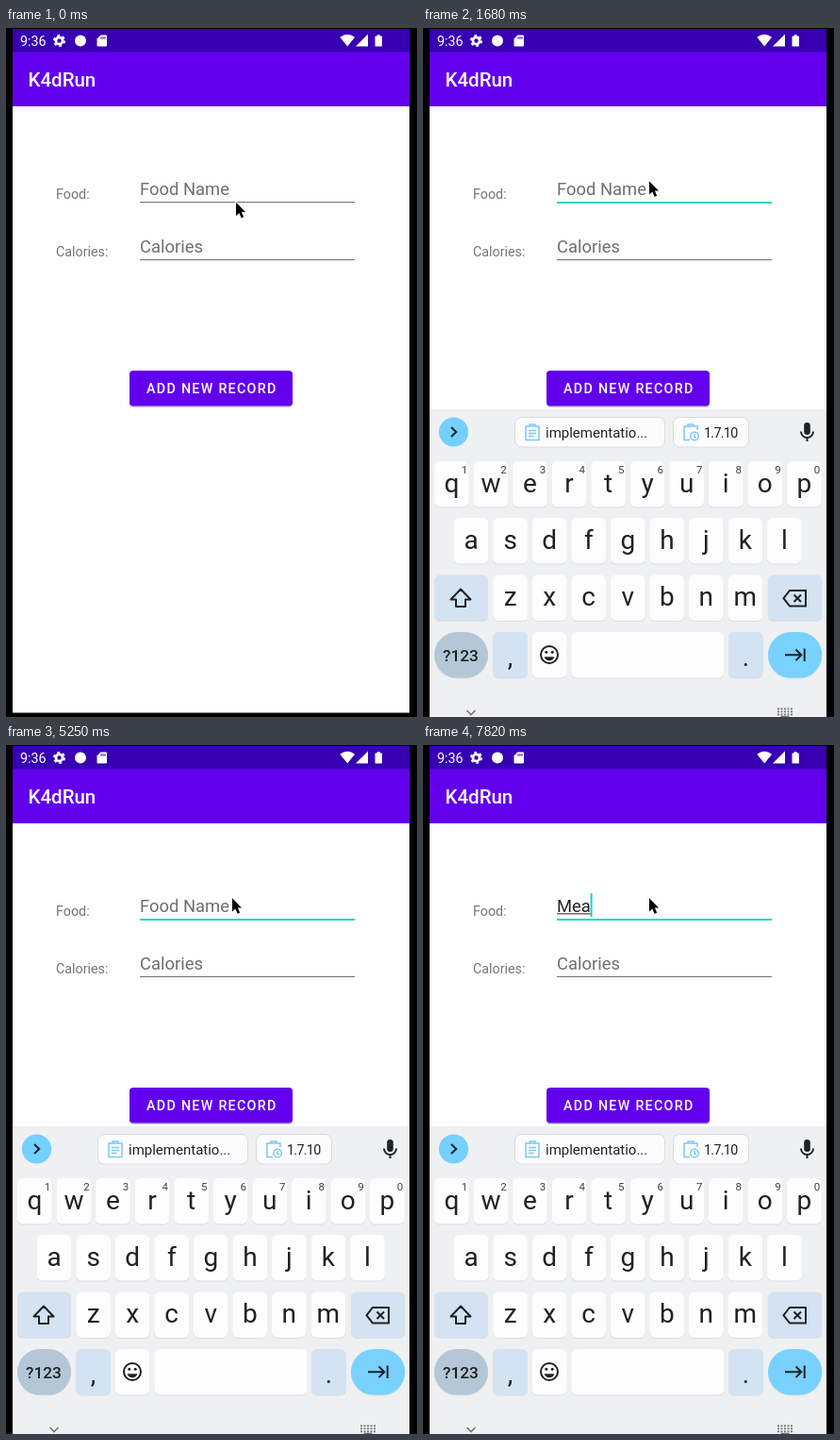
An HTML page that plays this animation: 436x730 px, repeating every 8 s.

```html
<!DOCTYPE html>
<html lang="en">
<head>
<meta charset="utf-8">
<title>Food record form</title>
<style>
html, body { margin: 0; width: 100%; height: 100%; overflow: hidden; background: #000; }
svg { display: block; width: 436px; height: 730px; font-family: Roboto, Arial, sans-serif; }
.label { font-size: 14.3px; fill: #757575; }
.field { font-size: 18.4px; fill: #6f6f6f; }
.key { font-size: 28px; fill: #202124; text-anchor: middle; }
.digit { font-size: 11.5px; fill: #3c4043; text-anchor: middle; }
.line { fill: none; stroke: #202124; stroke-width: 2; }
.clip { fill: none; stroke: #7cc9f2; stroke-width: 1.5; }
</style>
</head>
<body>
<svg viewBox="0 0 436 730">
  <rect width="436" height="730" fill="#000"/>
  <rect x="7" y="1" width="421" height="724.5" fill="#fefefe"/>
  <rect x="7" y="1" width="421" height="25" fill="#3700b3"/>
  <rect x="7" y="25.5" width="421" height="57.5" fill="#6200ee"/>

  <g fill="#fff">
    <text x="15" y="19" font-size="14.3">9:36</text>
    <circle cx="56.5" cy="13.5" r="3.6" fill="none" stroke="#fff" stroke-width="2.8"/>
    <circle cx="56.5" cy="13.5" r="5.6" fill="none" stroke="#fff" stroke-width="1.8" stroke-dasharray="2.93"/>
    <circle cx="79" cy="13.5" r="6"/>
    <path d="M100.5 7.5H106Q107 7.5 107 8.5V18.5Q107 19.5 106 19.5H97.5Q96.5 19.5 96.5 18.5V11.5Z"/>
    <path d="M101 9.2V11.8M103 9.2V11.8M105 9.2V11.8" stroke="#3700b3"/>
    <path d="M362.2 19.5L354.3 9.7Q362.2 3.8 370.1 9.7Z"/>
    <path d="M371 19.5H384V6.5Z"/>
    <path d="M393.7 7.2H396.7V8.4H398Q398.9 8.4 398.9 9.3V18.7Q398.9 19.6 398 19.6H392.4Q391.5 19.6 391.5 18.7V9.3Q391.5 8.4 392.4 8.4H393.7Z"/>
    <text x="23.5" y="62" font-size="20.5" font-weight="500">K4dRun</text>
  </g>

  <text class="label" x="53" y="180.5">Food:</text>
  <text class="label" x="53" y="241.5">Calories:</text>
  <text class="field" id="food" x="142" y="177">Food Name</text>
  <rect id="mark" x="142" y="178.3" height="1.1" fill="#333"/>
  <rect id="rule" x="142" y="184" width="228"/>
  <rect id="caret" y="157" width="2" height="25" fill="#14d8c4"/>
  <text class="field" x="142" y="238">Calories</text>
  <rect x="142" y="245" width="228" height="1.1" fill="#777"/>

  <rect x="131" y="364.5" width="173" height="37.5" rx="4" fill="#000" opacity=".2"/>
  <rect x="131" y="363" width="173" height="37.5" rx="4" fill="#6200ee"/>
  <text x="149" y="387.3" font-size="14.3" font-weight="500" letter-spacing="1.28" fill="#fff">ADD NEW RECORD</text>

  <g id="board">
    <rect x="7" y="404" width="421" height="340" fill="#eff0f2"/>
    <circle cx="32.5" cy="428" r="15.6" fill="#74d0fe"/>
    <path class="line" d="M30 423L35.2 428L30 433"/>
    <rect x="97.5" y="412.5" width="159" height="31.5" rx="7" fill="#fcfcfd" stroke="#d9dbdf"/>
    <path class="clip" d="M109 422H123V436.5H109ZM113 422V420H119V422M112 426.5H120M112 429.5H120M112 432.5H117.5"/>
    <text x="130" y="434.3" font-size="15" fill="#202124">implementatio...</text>
    <g id="chip">
      <rect x="265.5" y="412.5" width="80" height="31.5" rx="7" fill="#fcfcfd" stroke="#d9dbdf"/>
      <path class="clip" d="M283 436.5H277V422H291V426M281 422V420H287V422"/>
      <circle class="clip" cx="288" cy="432.5" r="4.3"/>
      <path class="clip" d="M288 430V433L290 434" stroke-width="1"/>
      <text x="298" y="434" font-size="14.3" letter-spacing="-.7" fill="#202124">1.7.10</text>
    </g>
    <rect x="404.2" y="418" width="6.6" height="13" rx="3.3" fill="#202124"/>
    <path class="line" d="M401 427.5A6.5 6.5 0 0 0 414 427.5M407.5 434V438"/>
    <g id="keys"></g>
    <path id="shift" class="line" stroke-linejoin="round" d="M40 594.5L50.5 605.5H45V613H35V605.5H29.5Z"/>
    <path class="line" d="M389 596H406V612.5H389L382.5 604.2ZM393.5 600.5L401 608M401 600.5L393.5 608"/>
    <text x="40" y="671" font-size="17.3" font-weight="500" text-anchor="middle" fill="#202124">?123</text>
    <circle class="line" cx="134" cy="664" r="9"/>
    <path d="M128.7 666.3H139.3A5.5 5.5 0 0 1 128.7 666.3Z" fill="#202124"/>
    <circle cx="130.8" cy="661.3" r="1.5" fill="#202124"/>
    <circle cx="137.2" cy="661.3" r="1.5" fill="#202124"/>
    <path class="line" d="M384 664.3H401M395.5 658.5L401.3 664.3L395.5 670.1M404.7 657.5V671"/>
    <path class="line" style="stroke:#70757a;stroke-width:1.6" d="M46.5 723L51 727.5L55.5 723"/>
    <path d="M376 721.3H392M376 724.3H392M376 727.3H392" stroke="#70757a" stroke-width="1.8" stroke-dasharray="2 1.5"/>
    <path d="M379.5 729.5H388.5" stroke="#70757a" stroke-width="1.5"/>
  </g>

  <path id="mouse" d="M0 0V14.2L3.3 11.2L5.6 16.6L8.2 15.5L5.9 10.2H10Z" fill="#000" stroke="#fff" stroke-width="1.8" paint-order="stroke" stroke-linejoin="round"/>
</svg>
<script>
const LOOP = 8000, PITCH = 41.55;
const $ = id => document.getElementById(id);
const food = $('food'), mark = $('mark'), rule = $('rule'), caret = $('caret');
const board = $('board'), chip = $('chip'), keys = $('keys'), shift = $('shift'), mouse = $('mouse');

function add(tag, attrs, text = '') {
  const el = document.createElementNS('http://www.w3.org/2000/svg', tag);
  for (const name in attrs) el.setAttribute(name, attrs[name]);
  el.textContent = text;
  return keys.appendChild(el);
}

function key(x, y, width = 36.7, fill = '#fdfdfe', rx = 6) {
  add('rect', { x, y: y + 1, width, height: 48.5, rx, fill: '#dcdee1' });
  add('rect', { x, y, width, height: 48.5, rx, fill });
}

const letters = [];
[['qwertyuiop', 12, 459], ['asdfghjkl', 32.7, 519], ['zxcvbnm', 74.2, 579.5]].forEach(([row, left, y], r) => {
  [...row].forEach((char, i) => {
    const x = left + i * PITCH;
    key(x, y);
    letters.push([char, add('text', { class: 'key', x: x + 18.4, y: y + 32.5 }, char)]);
    if (!r) add('text', { class: 'digit', x: x + 32, y: y + 13 }, (i + 1) % 10);
  });
});
const SIDE = '#d3e3f2';
key(12, 579.5, 57, SIDE);
key(366, 579.5, 57.3, SIDE);
key(12, 640, 57, '#b3c7d6', 24.2);
key(74.2, 640, 36.7, SIDE);
key(115.8, 640);
key(157.3, 640, 162);
key(324, 640, 36.7, SIDE);
key(366, 640, 57.3, '#78d1ff', 24.2);
add('text', { class: 'key', x: 92.5, y: 676 }, ',');
add('text', { class: 'key', x: 342.4, y: 676 }, '.');

// [time, x, y]
const path = [[0, 244, 184.7], [150, 240.5, 162.7], [300, 239, 160.7], [450, 240, 161.7], [600, 240, 162.2]];
// [time, text, caret x, underlined width]
const typing = [[0, '', 142.8, 0], [6930, 'M', 157.6, 16], [7520, 'Me', 167.4, 16], [7670, 'Mea', 177.6, 26], [7820, 'Mea', 177.6, 36]];
const blinks = [750, 1350, 1860, 2370, 2970, 3300, 3750, 4350, 4800, 5250, 5850, 6300, 6930, 7380, 7520];

const at = (steps, t) => steps.filter(step => step[0] <= t).pop();
const show = (el, on) => el.setAttribute('visibility', on ? 'visible' : 'hidden');

let upper = false;
function setCase(on) {
  if (on === upper) return;
  upper = on;
  for (const [char, el] of letters) el.textContent = on ? char.toUpperCase() : char;
  shift.style.fill = on ? '#202124' : 'none';
}

function draw(t) {
  const [, mx, my] = at(path, t);
  mouse.setAttribute('transform', `translate(${mx} ${my})`);

  const [, text, x, width] = at(typing, t);
  food.textContent = text || 'Food Name';
  food.style.fill = text ? '#222' : '';
  mark.setAttribute('width', width);
  caret.setAttribute('x', x);
  show(caret, blinks.filter(b => b <= t).length % 2);

  const focused = t >= 600;
  rule.setAttribute('height', focused ? 2 : 1.1);
  rule.setAttribute('fill', focused ? '#14d8c4' : '#777');

  const rising = t < 1680;
  show(board, t >= 1530);
  board.setAttribute('transform', `translate(0 ${rising ? 13 : 0})`);
  chip.setAttribute('transform', rising ? 'translate(305.5 428.3) scale(.88) translate(-305.5 -428.3)' : '');
  setCase(t >= 6750 && t < 6930);
}

function tick() {
  draw(performance.now() % LOOP);
  requestAnimationFrame(tick);
}
tick();
</script>
</body>
</html>
```
